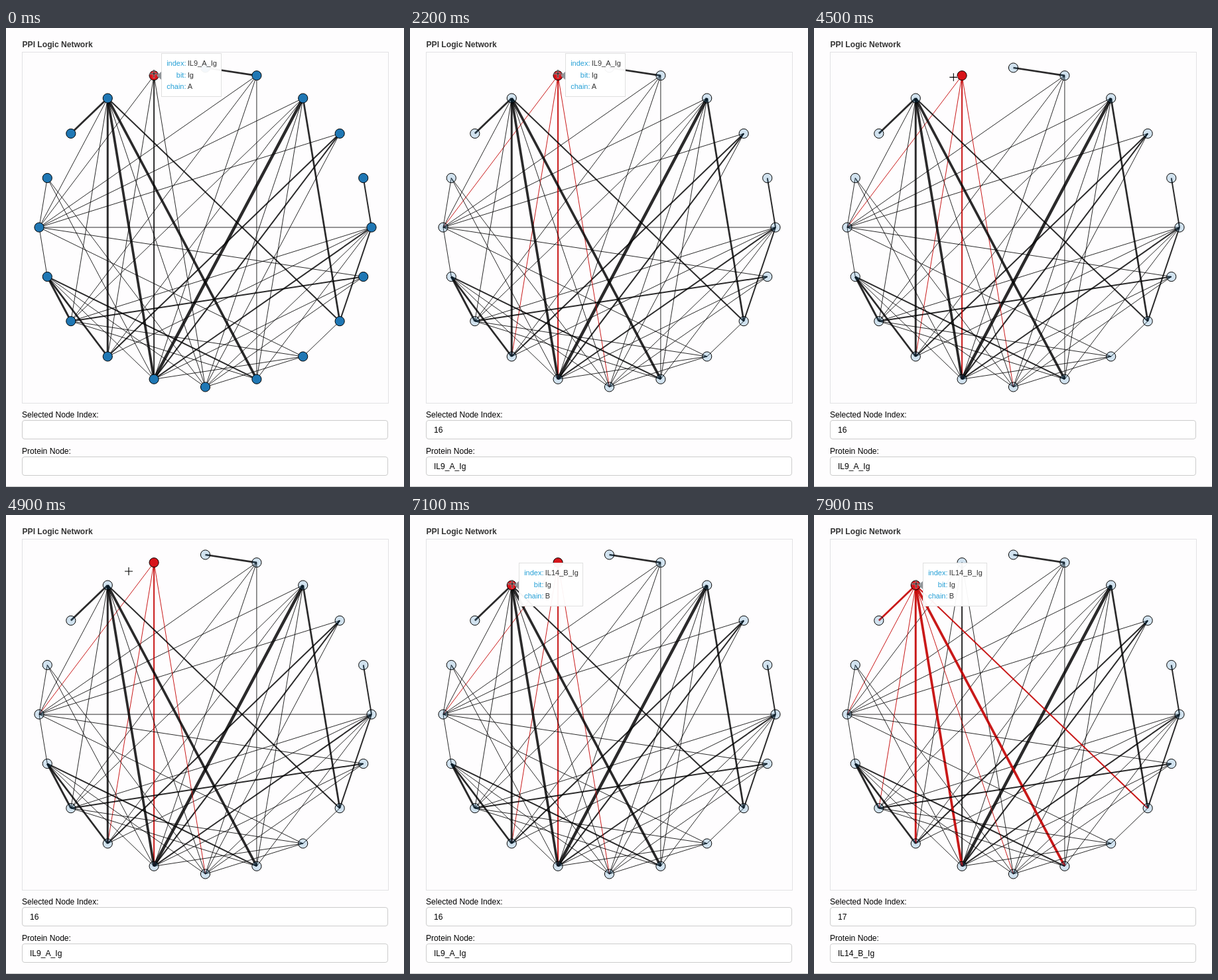
An HTML page for the animation above (8 s loop, 600x693 px).

```html
<!DOCTYPE html>
<html lang="en">
<head>
<meta charset="utf-8">
<title>PPI Logic Network</title>
<style>
  html, body { margin: 0; width: 100%; height: 100%; overflow: hidden; background: #fefdfe; }
  svg { display: block; width: 600px; height: 693px; font: 12.1px "Liberation Sans", Arial, sans-serif; }
  .title { font-weight: bold; fill: #333; }
  .box { fill: #fff; stroke: #ccc; }
  .edge { stroke: #000; stroke-opacity: .83; }
  .edge.on { stroke: #c40000; stroke-opacity: .9; }
  .node { fill: #1f77b4; stroke: #000; }
  .node.dim { fill-opacity: .2; }
  .node.on { fill: #d7141a; fill-opacity: 1; }
  .tip { font-size: 11px; fill: #333; }
  .tip rect { fill: #fff; fill-opacity: .95; stroke: #e0e0e0; }
  .tip path { fill: #909599; }
  .key { fill: #26a0d6; text-anchor: end; }
</style>
</head>
<body>
<svg viewBox="0 0 600 693">
  <text class="title" x="24.5" y="29">PPI Logic Network</text>
  <rect x="24.5" y="36.5" width="552" height="530" fill="#fefdfe" stroke="#e2e2e4"/>
  <g id="edges"></g>
  <g id="nodes"></g>
  <text x="24" y="587.5">Selected Node Index:</text>
  <rect class="box" x="24.5" y="592.5" width="551" height="28" rx="3.5"/>
  <text id="index" x="36" y="611"></text>
  <text x="24" y="642.5">Protein Node:</text>
  <rect class="box" x="24.5" y="647.5" width="551" height="28" rx="3.5"/>
  <text id="protein" x="36" y="666"></text>
  <path d="M0 692.5H600" stroke="#c4c4c6"/>
  <g id="tips"></g>
  <g id="cursor" fill="none">
    <path d="M-6.5 0H6.5M0 -6.5V6.5" stroke="#fff" stroke-width="2.6" stroke-opacity=".7"/>
    <path d="M-6 0H6M0 -6V6" stroke="#000" stroke-width="1.1"/>
  </g>
</svg>
<script>
const $ = id => document.getElementById(id);

function add(parent, tag, attrs, text = '') {
  const el = document.createElementNS('http://www.w3.org/2000/svg', tag);
  for (const k in attrs) el.setAttribute(k, attrs[k]);
  el.textContent = text;
  parent.append(el);
  return el;
}

// Nodes run counterclockwise from the right-hand end of the ellipse.
const COUNT = 20;
const place = i => {
  const a = i * 2 * Math.PI / COUNT;
  return [300.5 + 250.5 * Math.cos(a), 301 - 241 * Math.sin(a)];
};

// from: "to:width", width 1 when left out
const LINKS = {
  0: '1:2 10 12 13 14:2 15 16 18:2',
  2: '10 13:2 14:2 15',
  3: '10 12 13 14:4.5 15 16 18:2.7',
  4: '5:2.7 10 12 14 16',
  6: '10 13 14:2 15',
  7: '8:2.8 10 12 13:3 14:3.7 15 16:3.7 18:2',
  9: '10 14 15',
  10: '11 17 19',
  11: '12:3 13:2.8 14 15 16:2',
  12: '17 19:2 16',
  14: '17 19',
  15: '17 19',
  17: '18'
};

const edges = [];
for (const from in LINKS) {
  for (const link of LINKS[from].split(' ')) {
    const [to, width = 1] = link.split(':').map(Number);
    const [x1, y1] = place(+from), [x2, y2] = place(to);
    const el = add($('edges'), 'line', { class: 'edge', x1, y1, x2, y2, 'stroke-width': width });
    edges.push({ el, from: +from, to });
  }
}

const nodes = Array.from({ length: COUNT }, (_, i) => {
  const [cx, cy] = place(i);
  return add($('nodes'), 'circle', { class: 'node', cx, cy, r: 7.1 });
});

const PROTEINS = {
  6: { index: 16, name: 'IL9_A_Ig', chain: 'A', width: 90 },
  7: { index: 17, name: 'IL14_B_Ig', chain: 'B', width: 96 }
};

const tips = {};
for (const id in PROTEINS) {
  const { name, chain, width } = PROTEINS[id];
  const [x, y] = place(+id).map(Math.round);
  const g = tips[id] = add($('tips'), 'g', { class: 'tip', transform: `translate(${x} ${y})` });
  add(g, 'path', { d: 'M4 0L11 -6V6Z' });
  add(g, 'rect', { x: 11.5, y: -33.5, width, height: 65 });
  [['index:', name], ['bit:', 'Ig'], ['chain:', chain]].forEach(([key, value], row) => {
    const line = -15 + row * 17.7;
    add(g, 'text', { class: 'key', x: 48.5, y: line }, key);
    add(g, 'text', { x: 50.8, y: line }, value);
  });
}

// time, x, y of the pointer
const PATH = [
  [0, 223, 69], [4300, 223, 69], [4900, 185, 85],
  [5400, 159, 103], [5600, 157, 104], [6100, 154, 104], [8000, 154, 104]
];

function pointer(t) {
  const k = Math.max(1, PATH.findIndex(p => p[0] > t));
  const [t0, x0, y0] = PATH[k - 1], [t1, x1, y1] = PATH[k];
  const f = (t - t0) / (t1 - t0);
  return [x0 + (x1 - x0) * f, y0 + (y1 - y0) * f];
}

function draw(t) {
  const selected = t < 2200 ? -1 : t < 7400 ? 6 : 7;
  const hovered = t < 4500 ? 6 : t < 5300 ? -1 : 7;
  const info = PROTEINS[selected];

  nodes.forEach((el, i) => {
    el.classList.toggle('dim', selected >= 0);
    el.classList.toggle('on', i === selected || i === hovered);
  });
  for (const { el, from, to } of edges) {
    el.classList.toggle('on', from === selected || to === selected);
  }
  for (const id in tips) tips[id].style.display = +id === hovered ? '' : 'none';
  $('index').textContent = info ? info.index : '';
  $('protein').textContent = info ? info.name : '';
  $('cursor').setAttribute('transform', `translate(${pointer(t)})`);
}

const start = performance.now();
function tick() {
  const t = (performance.now() - start) % 8000;
  draw(Math.floor(t / 100) * 100);
  requestAnimationFrame(tick);
}
draw(0);
requestAnimationFrame(tick);
</script>
</body>
</html>
```
